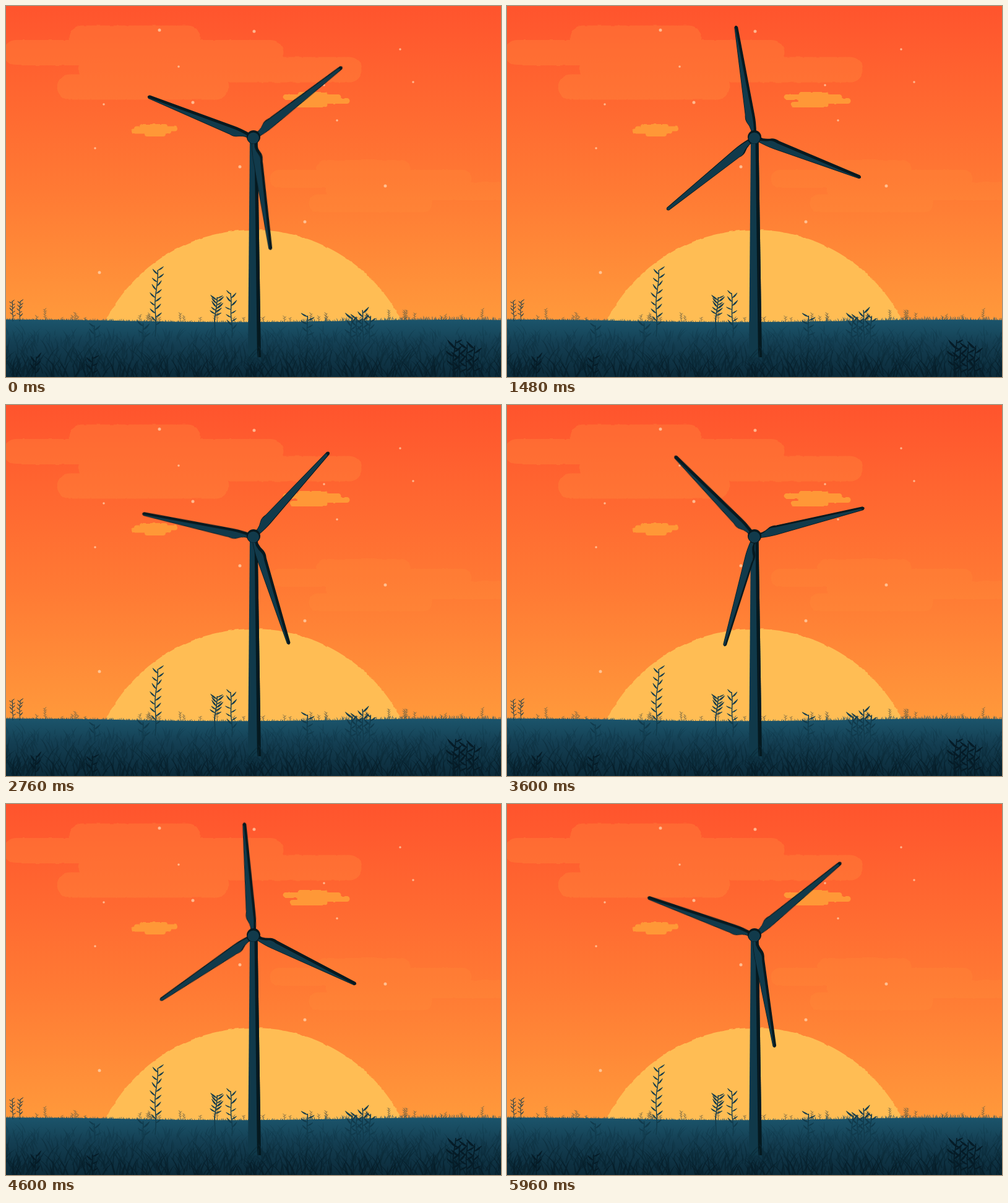
An HTML page that plays this animation: 800 px wide and 600 px high, repeating every 6 s.

```html
<!DOCTYPE html>
<html lang="en">
<head>
<meta charset="utf-8">
<title>Wind turbine at sunset</title>
<style>
html, body { margin: 0; width: 100%; height: 100%; overflow: hidden; background: #ff7b34; }
svg { display: block; width: 800px; height: 600px; }
.round { fill: none; stroke-linecap: round; }
</style>
</head>
<body>
<svg viewBox="0 0 800 600" xmlns="http://www.w3.org/2000/svg">
  <defs>
    <linearGradient id="sky" x2="0" y2="1">
      <stop stop-color="#ff542d"/>
      <stop offset=".5" stop-color="#ff7a34"/>
      <stop offset=".85" stop-color="#ff993b"/>
    </linearGradient>
    <linearGradient id="soil" gradientUnits="userSpaceOnUse" x1="0" y1="508" x2="0" y2="600">
      <stop stop-color="#1b546b"/>
      <stop offset=".2" stop-color="#184b60"/>
      <stop offset=".4" stop-color="#143f53"/>
      <stop offset="1" stop-color="#0b2a39"/>
    </linearGradient>
    <filter id="rough" filterUnits="userSpaceOnUse" x="-20" y="0" width="840" height="600" color-interpolation-filters="sRGB">
      <feTurbulence type="fractalNoise" baseFrequency=".09" numOctaves="2" seed="4"/>
      <feDisplacementMap in="SourceGraphic" scale="3" xChannelSelector="R" yChannelSelector="G"/>
    </filter>
    <path id="blade" d="M7-3.5L13-3Q20-4 27-8Q32-10 39-8.3L181-2.2Q185 0 181 2.2L36 5.6Q24 6 7 3.5Z"/>
    <clipPath id="bladeClip"><use href="#blade"/></clipPath>
  </defs>
  <rect width="800" height="600" fill="url(#sky)"/>
  <g class="round" filter="url(#rough)">
    <path d="M122 52H294M16 75.5H428M138 103H555M103 131H339" stroke="#ff9140" stroke-width="41" opacity=".3"/>
    <path d="M516 263.5H639M441 279.5H738M532 299.5H830M504 319H674" stroke="#ff9b42" stroke-width="29" opacity=".16"/>
    <path d="M476 143.5H516M452 147.5H537M474 153.5H551M464 159.5H514" stroke="#ff9837" stroke-width="9"/>
    <path d="M220 195H257M211 198.5H273M206 202.5H263M228 207H254" stroke="#ff9837" stroke-width="8"/>
  </g>
  <g class="round" stroke="#ffd9b4" opacity=".72">
    <path d="M248 39h0M302 156h0M151 431h0M378 260h0M613 291h0M483 349h0M401 41h0" stroke-width="5"/>
    <path d="M637 70h0M658 123h0M279 98h0M158 159h0M144 230h0M514 128h0M535 185h0" stroke-width="3.5"/>
  </g>
  <circle cx="400" cy="630" r="268" fill="#ffbd54" filter="url(#rough)"/>
  <g id="meadow"></g>
  <path d="M394 216H406.5L412 568H391Z" fill="#10394a"/>
  <path d="M401.5 216H406.5L412 568H406Z" fill="#05191f"/>
  <g id="rotor"></g>
  <circle cx="400" cy="212" r="11" fill="#06191f"/>
  <circle cx="399.7" cy="213.6" r="9.2" fill="#113a4b"/>
  <g id="foreground"></g>
</svg>
<script>
const PERIOD = 6000, TURN = 240, FIRST_ANGLE = -38.7;
const HUB_X = 400, HUB_Y = 213, SHADE = 3;
const meadow = document.getElementById("meadow");
const foreground = document.getElementById("foreground");
const rotor = document.getElementById("rotor");

function add(parent, tag, attrs = {}) {
  const node = document.createElementNS("http://www.w3.org/2000/svg", tag);
  for (const key in attrs) node.setAttribute(key, attrs[key]);
  return parent.appendChild(node);
}

let seed = 90210;
const random = () => (seed = seed * 16807 % 2147483647) / 2147483647;
const between = (a, b) => a + (b - a) * random();
const point = (x, y) => `${x.toFixed(1)} ${y.toFixed(1)}`;

// Colour of the grass from the middle of the field (0) to its front edge (1).
const shade = depth => `rgb(${19 - 13 * depth},${64 - 36 * depth},${83 - 44 * depth})`;
const horizonY = x => 509.3 + 2 * Math.cos((x - 370) / 110);

function grassBlade(x, y, height, lean) {
  const width = .6 + height / 45;
  const midX = x + lean * .3, midY = y - height * .65;
  return `M${point(x - width, y)}Q${point(midX - width, midY)} ${point(x + lean, y - height)}` +
    `Q${point(midX + width, midY)} ${point(x + width, y)}Z`;
}

function grassRow(parent, base, height, depth, count, left = -10, right = 810) {
  let d = "";
  for (let i = 0; i < count; i++) {
    const h = height * between(.5, 1.1);
    d += grassBlade(between(left, right), base + between(-4, 4), h, h * between(-.9, .9));
  }
  add(parent, "path", { d, fill: shade(depth), opacity: .75 });
}

// A slightly bent stem with slim, alternating leaves above the bare part.
function plant(parent, x, base, height, leaf, color, bare = .25, spacing = .6) {
  const lean = height * between(-.04, .08);
  const stemX = p => x + lean * p * p + Math.sin(p * 9) * height / 90;
  let leaves = "", stem = `M${point(x, base)}`, side = 1;
  for (let p = 0; p <= 1; p += .1) stem += `L${point(stemX(p), base - height * p)}`;
  for (let p = bare; p <= 1; p += leaf * spacing / height) {
    const px = stemX(p), py = base - height * p;
    const reach = side * leaf * between(.7, 1.1), rise = leaf * between(.4, 1);
    leaves += `M${point(px, py)}Q${point(px + reach * .65, py - rise * .1)} ${point(px + reach, py - rise)}` +
      `Q${point(px + reach * .35, py - rise * .5)} ${point(px, py)}`;
    side = -side;
  }
  add(parent, "path", { d: leaves, fill: color, stroke: color, "stroke-width": leaf / 14 });
  add(parent, "path", { d: stem, fill: "none", stroke: color, "stroke-width": .5 + leaf / 10 });
}

function drawHorizon() {
  for (let i = 0; i < 46; i++) {
    const x = between(0, 800);
    plant(meadow, x, 510, 6 + 14 * random() ** 2, 3, "#6b6247");
  }
  let soil = "M0 600", tufts = "";
  for (let x = 0; x <= 800; x += 20) soil += `L${point(x, horizonY(x))}`;
  for (let x = 0; x < 800; x += between(1, 4)) {
    const height = between(2, x > 470 ? 8 : 4.5);
    tufts += grassBlade(x, horizonY(x) + 1, height, height * between(-.6, .6));
  }
  add(meadow, "path", { d: soil + "L800 600Z", fill: "url(#soil)" });
  add(meadow, "path", { d: tufts, fill: "#245364", opacity: .8 });
}

function drawMeadow() {
  const stalk = shade(.15);
  drawHorizon();
  for (const x of [11, 22]) plant(meadow, x, 510, 33, 5, stalk);
  plant(meadow, 241, 535, 108, 9, stalk, .18, .7);
  plant(meadow, 337, 545, 74, 10, stalk, .6, .28);
  plant(meadow, 365, 537, 73, 9, stalk, .2, .7);
  for (const x of [143, 222, 487]) plant(meadow, x, 543, 20 + x / 22, 10, stalk);
  for (let x = 557; x < 590; x += 10) plant(meadow, x, 546, between(42, 58), 10, stalk);

  const rows = 13;
  for (let i = 0; i < rows; i++) {
    const depth = i / (rows - 1), base = 535 + 74 * depth;
    grassRow(base < 572 ? meadow : foreground, base, 17 + 17 * depth, depth, 85);
  }
  grassRow(foreground, 575, 15, .45, 14, 386, 418);
  for (let x = 722; x < 765; x += 11) plant(foreground, x, 604, between(45, 67), 12, shade(1));
  for (const x of [47, 139]) plant(foreground, x, 603, 36, 10, shade(1));
}

function makeBlade(offset) {
  const group = add(rotor, "g");
  add(group, "use", { href: "#blade", fill: "#06191f", stroke: "#06191f", "stroke-width": 1.4 });
  const clipped = add(group, "g", { "clip-path": "url(#bladeClip)" });
  const lit = add(clipped, "use", { href: "#blade", fill: "#113a4b" });
  return { offset, group, lit };
}

drawMeadow();
const blades = [0, 120, 240].map(makeBlade);

function render(time) {
  const spin = FIRST_ANGLE + TURN * (time % PERIOD) / PERIOD;
  for (const { offset, group, lit } of blades) {
    const angle = spin + offset, a = angle * Math.PI / 180;
    // The lit face stays toward the lower left while the blade turns.
    const dx = SHADE * (Math.sin(a) - Math.cos(a));
    const dy = SHADE * (Math.cos(a) + Math.sin(a));
    group.setAttribute("transform", `translate(${HUB_X} ${HUB_Y}) rotate(${angle})`);
    lit.setAttribute("transform", `translate(${dx} ${dy})`);
  }
}

const start = performance.now();
function tick(now) {
  render(Math.max(0, now - start));
  requestAnimationFrame(tick);
}
render(0);
requestAnimationFrame(tick);
</script>
</body>
</html>
```
